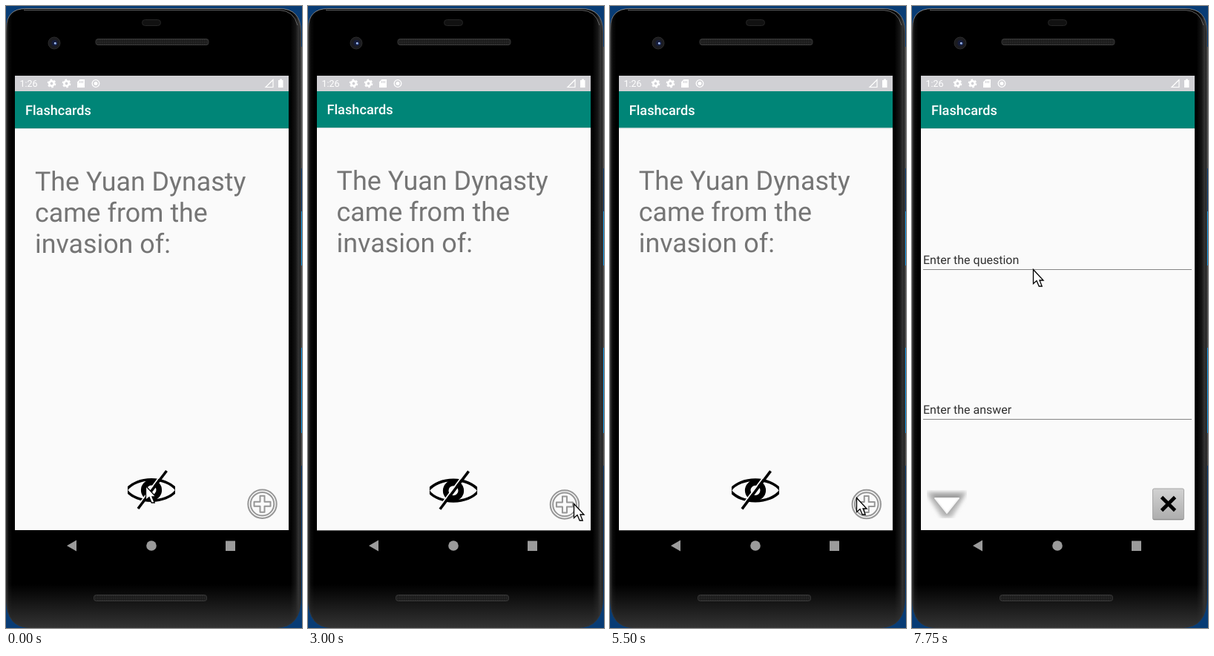
An HTML page that plays this animation: 399 px wide and 839 px high, repeating every 8000 ms.

```html
<!DOCTYPE html>
<html lang="en">
<head>
<meta charset="utf-8">
<title>Flashcards</title>
<style>
  html, body { margin: 0; width: 100%; height: 100%; overflow: hidden; background: #000; }
  svg { display: block; width: 399px; height: 839px; }
  text { font-family: Roboto, sans-serif; text-rendering: geometricPrecision; }
  .question { font-size: 35.8px; fill: #757575; }
  .hint { font-size: 16px; fill: #303030; }
  .title { font-size: 18.1px; font-weight: 500; fill: #fff; }
</style>
</head>
<body>
<svg viewBox="0 0 399 839" xmlns="http://www.w3.org/2000/svg">
  <defs>
    <linearGradient id="edge" x1="0" x2="1" y1="0" y2="0">
      <stop offset="0" stop-color="#303030"/><stop offset=".008" stop-color="#0a0a0a"/>
      <stop offset=".02" stop-color="#000"/><stop offset=".965" stop-color="#000"/>
      <stop offset=".982" stop-color="#141414"/><stop offset=".992" stop-color="#333"/>
      <stop offset="1" stop-color="#222"/>
    </linearGradient>
    <linearGradient id="rim" x1="0" x2="0" y1="0" y2="1">
      <stop offset="0" stop-color="#8a8a8a"/><stop offset=".04" stop-color="#484848"/>
      <stop offset=".94" stop-color="#2a2a2a"/><stop offset="1" stop-color="#3a3a3a"/>
    </linearGradient>
    <linearGradient id="chin" x1="0" x2="0" y1="0" y2="1">
      <stop offset=".93" stop-color="#333" stop-opacity="0"/><stop offset="1" stop-color="#333"/>
    </linearGradient>
    <linearGradient id="button" x1="0" x2="0" y1="0" y2="1">
      <stop offset="0" stop-color="#d2d2d2"/><stop offset="1" stop-color="#adadad"/>
    </linearGradient>
    <pattern id="mesh" width="3" height="3" patternUnits="userSpaceOnUse">
      <rect width="3" height="3" fill="#1d1d1d"/><rect width="1.5" height="1.5" fill="#2b2b2b"/>
    </pattern>
    <filter id="soft" x="-30%" y="-30%" width="160%" height="160%"><feGaussianBlur stdDeviation="2.4"/></filter>
    <clipPath id="screen"><rect x="12" y="94" width="369" height="613.5"/></clipPath>
    <clipPath id="arrowBox"><rect x="20" y="653" width="54" height="38"/></clipPath>
    <clipPath id="eyeBox"><rect x="164" y="620" width="64" height="64"/></clipPath>
    <path id="body" d="M.5 30Q.5 3.5 27 3.5H368Q397.500 3.5 397.500 34V798Q397.500 838.500 364 838.500H32Q.5 838.500 .5 800Z"/>
    <g id="gear" fill="none" stroke="#fff">
      <circle r="3.2" stroke-width="2.6"/><circle r="5" stroke-width="1.8" stroke-dasharray="2.6 2.636"/>
    </g>
    <g id="bar">
      <path d="M8 115H385V165H8Z" fill="#008577"/>
      <path d="M8 165.500H385" stroke="#dcdcdc"/>
      <text class="title" x="26" y="147">Flashcards</text>
    </g>
  </defs>

  <!-- desktop behind the phone -->
  <rect width="399" height="839" fill="#083c75"/>
  <path d="M397 277H399V350H397ZM397 460H399V576H397Z" fill="#1097e6"/>

  <!-- phone body -->
  <path d="M396 55H399V219H396ZM396 350H399V461H396ZM396 576H399V620H396Z" fill="#505050"/>
  <use href="#body" fill="url(#edge)" stroke="url(#rim)"/>
  <use href="#body" fill="url(#chin)"/>
  <path d="M24 5.500H368Q388 6 393 26" fill="none" stroke="#666"/>
  <rect x="183.500" y="18.500" width="25" height="8" rx="4" fill="#111" stroke="#252525"/>
  <rect x="121" y="44.500" width="152" height="8" rx="3" fill="url(#mesh)" stroke="#393939"/>
  <rect x="118.500" y="794.500" width="152" height="8" rx="3" fill="url(#mesh)" stroke="#393939"/>
  <circle cx="65" cy="50" r="8" fill="#1c1c20" stroke="#2b2b2b"/>
  <circle cx="65.500" cy="50" r="4" fill="#151c3a"/>
  <circle cx="66.500" cy="50.500" r="1.800" fill="#5a78b8"/>
  <circle cx="66" cy="50" r="1" fill="#c4d4f4"/>

  <!-- screen -->
  <g clip-path="url(#screen)">
    <g id="card">
      <path d="M12 94H381V707H12Z" fill="#fafafa"/>
      <use href="#bar"/>
      <g class="question">
        <text x="39" y="248.500">The Yuan Dynasty</text>
        <text x="39" y="290.500">came from the</text>
        <text x="39" y="332.500">invasion of:</text>
      </g>
      <path d="M162 653C176 634 216 634 230 653C216 672 176 672 162 653Z" fill="#fafafa" stroke="#000" stroke-width="3.600" clip-path="url(#eyeBox)"/>
      <circle cx="196" cy="653" r="10.300" fill="#fafafa" stroke="#000" stroke-width="7.600"/>
      <path d="M213.500 626L175.500 677" stroke="#fafafa" stroke-width="1.800"/>
      <path d="M216.500 627L178 678" stroke="#000" stroke-width="3.600"/>
      <g transform="translate(345.500 671.700)" fill="none" stroke="#979797" stroke-width="2">
        <circle r="19.200"/><circle r="15.800"/>
        <path d="M-3-11H3V-3H11V3H3V11H-3V3H-11V-3H-3Z" stroke-linejoin="round"/>
      </g>
    </g>
    <g id="form">
      <path d="M8 94H381V707H8Z" fill="#fafafa"/>
      <use href="#bar"/>
      <text class="hint" x="15" y="348">Enter the question</text>
      <text class="hint" x="15" y="550">Enter the answer</text>
      <path d="M15 355.500H377M15 557.500H377" stroke="#848484"/>
      <g clip-path="url(#arrowBox)">
        <path d="M20 655H74L70 664L54 690H40L23 664Z" fill="#c2c2c2" filter="url(#soft)"/>
        <path d="M26 659H68L47 687Z" fill="#9a9a9a" filter="url(#soft)"/>
        <path d="M31 664H63L47 684Z" fill="#fff" stroke="#f4f4f4" stroke-width="2" stroke-linejoin="round"/>
      </g>
      <rect x="324.500" y="651" width="42" height="42" rx="2" fill="url(#button)" stroke="#a8a8a8"/>
      <path d="M325 692.500H366" stroke="#8c8c8c"/>
      <path d="M336.500 662.500L354.500 680.500M354.500 662.500L336.500 680.500" stroke="#000" stroke-width="4.800"/>
    </g>
    <!-- status bar -->
    <path d="M12 94H381V115H12Z" fill="#d0d0d4"/>
    <path id="gap" d="M12 115H381V116H12Z" fill="#d0d0d4"/>
    <text x="18.500" y="109" font-size="12.500" fill="#fff">1:26</text>
    <use href="#gear" x="61.500" y="104.500"/>
    <use href="#gear" x="81.500" y="104.500"/>
    <path d="M99.500 99H106V110H96V102.500Z" fill="#fff"/>
    <path d="M99.500 101V104M101.500 101V104M103.500 101V104" stroke="#d0d0d4"/>
    <circle cx="121" cy="104.500" r="4.800" fill="none" stroke="#fff" stroke-width="1.300"/>
    <circle cx="121" cy="104.500" r="2.500" fill="#fff"/>
    <path d="M350 109.500L360 99.500V109.500Z" fill="none" stroke="#fff" stroke-width="1.200"/>
    <path d="M367 100H369V98.500H372V100H373.500V110H367Z" fill="#fff"/>
  </g>

  <!-- navigation keys -->
  <g fill="#9b9b9b">
    <path d="M82 728L95 720.500V735.500Z"/>
    <circle cx="196" cy="728" r="6.800"/>
    <rect x="296" y="721.500" width="13" height="13.500"/>
  </g>

  <path id="cursor" d="M.5 .5V19.500L5 15.500L8.200 23H12.200L9 15H14Z" fill="#fff" stroke="#000" stroke-width="1.300"/>
</svg>
<script>
const LOOP = 8000, STEP = 250;
const [card, form, gap, cursor] = ['card', 'form', 'gap', 'cursor'].map(id => document.getElementById(id));

// [start ms, x, y] of the pointer tip
const moves = [
  [0, 188, 647], [750, 212, 642], [1000, 149, 566], [1250, 282, 671],
  [1500, 367, 667], [1750, 362, 669], [2000, 354, 671], [2250, 358, 671],
  [3500, 288, 538], [3750, 247, 520], [4000, 246, 548], [4250, 301, 628],
  [4500, 332, 663], [6500, 333, 663], [7250, 285, 590], [7500, 163, 405], [7750, 163, 355]
];

// [start ms, visible page, zoom]
const pages = [
  [0, card, 1], [3000, card, 1.003], [3250, form, .9967], [3500, form, 1],
  [5250, card, 1.012], [5500, card, 1.0016], [5750, card, 1],
  [6750, card, 1.003], [7000, form, .9967], [7250, form, 1]
];

const at = (keys, t) => keys.findLast(key => key[0] <= t);

function draw(t) {
  const [, x, y] = at(moves, t);
  const [, page, zoom] = at(pages, t);
  cursor.setAttribute('transform', `translate(${x} ${y})`);
  for (const p of [card, form]) p.style.display = p === page ? '' : 'none';
  page.setAttribute('transform', `translate(196.5 421) scale(${zoom}) translate(-196.5 -421)`);
  gap.style.display = zoom < 1 ? '' : 'none';
}

const start = performance.now();
function tick() {
  const t = (performance.now() - start) % LOOP;
  draw(Math.floor(t / STEP) * STEP);
  requestAnimationFrame(tick);
}
tick();
</script>
</body>
</html>
```
